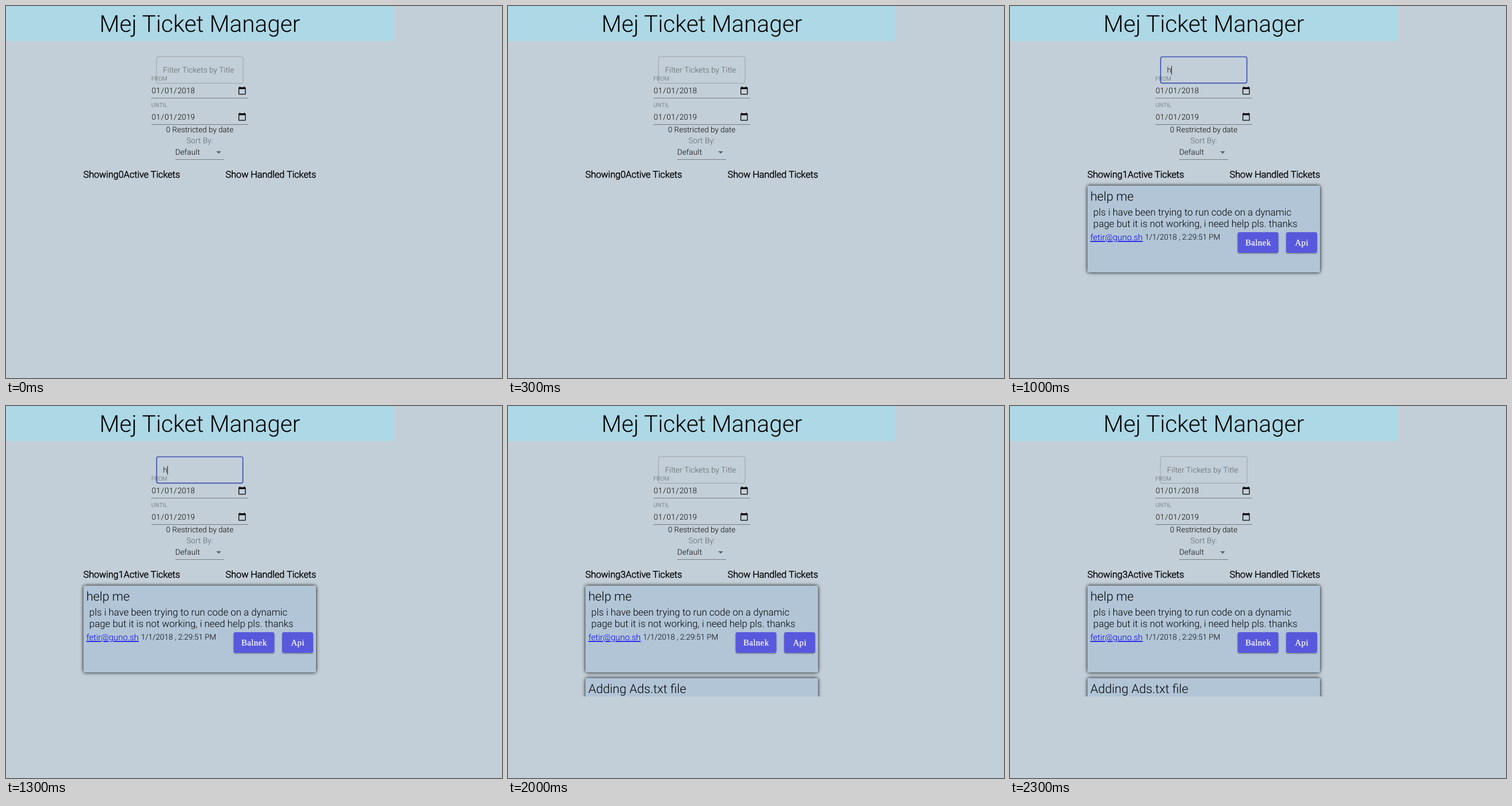
Write an HTML page that moves like this. It is 864 by 648 pixels and loops after 2.5 s.

```html
<!DOCTYPE html>
<html lang="en">
<head>
<meta charset="utf-8">
<title>Ticket manager</title>
<style>
  html, body { margin: 0; width: 100%; height: 100%; overflow: hidden; background: #c3cfd8; }
  svg { display: block; width: 864px; height: 648px; }
  text { font: 300 13.5px Roboto, sans-serif; text-rendering: geometricPrecision; white-space: pre; }
  .spaced { letter-spacing: .00938em; }
  .soft { fill-opacity: .54; }
  .label { font-size: 10.125px; }
  .end { text-anchor: end; }
  .mid { text-anchor: middle; }
  .bar { font-size: 16.2px; stroke: currentColor; stroke-width: .55px; fill: currentColor; color: #000; }
  .title { font-size: 21.6px; }
  .body { font-size: 16.875px; }
  .action { font-size: 20.25px; }
  .mail { font-size: 14.85px; fill: #00e; text-decoration: underline; }
  .tag { font: 14.85px "Liberation Serif", serif; letter-spacing: .02857em; fill: #fff; stroke: #fff; stroke-width: .25px; text-anchor: middle; }
  .line { fill: none; stroke: #000; stroke-opacity: .45; stroke-width: .9; }
  .card { fill: #b2c5d7; filter: url(#glow); }
  .button { fill: #5958dc; filter: url(#lift); }
</style>
</head>
<body>
<svg viewBox="0 0 864 648">
  <defs>
    <filter id="glow" x="-10%" y="-20%" width="120%" height="140%">
      <feDropShadow dx="0" dy="0" stdDeviation="3.3" flood-color="#000"/>
    </filter>
    <filter id="lift" x="-20%" y="-20%" width="140%" height="150%">
      <feDropShadow dx="0" dy="1.3" stdDeviation="1.3" flood-color="#000" flood-opacity=".4"/>
    </filter>
    <clipPath id="page"><path d="M0 0H675V506H0z"/></clipPath>
    <path id="calendar" transform="scale(.633)" d="M20 3h-1V1h-2v2H7V1H5v2H4c-1.1 0-2 .9-2 2v16c0 1.1.9 2 2 2h16c1.1 0 2-.9 2-2V5c0-1.1-.9-2-2-2zm0 18H4V8h16v13z"/>
    <g id="helpCard">
      <rect class="card" x="135" y="313" width="405" height="151" rx="3.4"/>
      <text class="title" x="140" y="338.5">help me</text>
      <text class="body" x="145.1" y="364.6">pls i have been trying to run code on a dynamic</text>
      <text class="body" x="145.1" y="384.9">page but it is not working, i need help pls. thanks</text>
      <text class="mail" x="140" y="408.4">fetir@guno.sh</text>
      <text x="235" y="407">1/1/2018 , 2:29:51 PM</text>
      <rect class="button" x="396.5" y="394" width="71" height="36" rx="3.4"/>
      <rect class="button" x="481" y="394" width="54" height="36" rx="3.4"/>
      <text class="tag" x="432.2" y="417">Balnek</text>
      <text class="tag" x="508.2" y="417">Api</text>
    </g>
  </defs>

  <g clip-path="url(#page)">
    <path fill="#add8e6" d="M0 0H675V61H0z"/>
    <text class="mid" x="337.5" y="44.8" style="font-size:40.5px">Mej Ticket Manager</text>

    <g data-scenes="0134">
      <rect x="262" y="88" width="151" height="46.6" rx="3.4" class="line" style="stroke-opacity:.25"/>
      <text class="spaced soft" x="273.6" y="116.3">Filter Tickets by Title</text>
    </g>
    <g data-scenes="2">
      <rect x="262.4" y="88.5" width="150.2" height="45.8" rx="3" fill="none" stroke="#3f51b5" stroke-width="1.7"/>
      <text class="spaced" x="273.6" y="116.3">h</text>
      <path d="M281.5 104.5V119.5" stroke="#000" stroke-width=".9"/>
    </g>

    <text class="spaced soft label" x="253" y="130">FROM</text>
    <text class="spaced" x="253.8" y="152" dx="0 0 .85 .85 0 .85 .85">01/01/2018</text>
    <use href="#calendar" x="403.7" y="139.6"/>
    <text class="spaced soft label" x="253" y="175.6">UNTIL</text>
    <text class="spaced" x="253.8" y="197.6" dx="0 0 .85 .85 0 .85 .85">01/01/2019</text>
    <use href="#calendar" x="403.7" y="185.2"/>
    <path class="line" d="M253 160.5H421.8M253 206.5H421.8M295 267.5H380"/>

    <text class="mid" x="337.5" y="219.7">0 Restricted by date</text>
    <text class="mid spaced soft" x="337.5" y="238.9">Sort By:</text>
    <text class="spaced" x="294.7" y="259.2">Default</text>
    <path class="soft" d="M366.2 253h8.5l-4.25 4.25z"/>

    <g data-scenes="0124">
      <text class="bar" x="134.8" y="299">Showing<tspan id="count">0</tspan>Active Tickets</text>
      <text class="bar end" x="540.2" y="299">Show Handled Tickets</text>
    </g>
    <g data-scenes="124"><use href="#helpCard"/></g>
    <g data-scenes="14">
      <rect class="card" x="135" y="474" width="405" height="151" rx="3.4"/>
      <text class="title" x="140" y="499.7">Adding Ads.txt file</text>
    </g>

    <g data-scenes="3">
      <text class="bar" x="134.8" y="299">Showing1Active</text>
      <text class="bar" x="134.8" y="318.5">Tickets</text>
      <g style="--dim:gray">
        <text class="bar" x="274.5" y="299" style="color:gray">(2hidden</text>
        <text class="bar end" x="344.5" y="318.5" style="color:gray">tickets -</text>
        <text class="bar end" x="408.8" y="299" style="color:#4444e4">restore</text>
        <text class="bar end" x="414" y="299" style="color:gray">)</text>
      </g>
      <text class="bar" x="414" y="299">Show Handled</text>
      <text class="bar" x="414" y="318.5">Tickets</text>

      <rect class="card" x="135" y="332.5" width="405" height="230" rx="3.4"/>
      <text class="title" x="140" y="358">Notifications not working</text>
      <text class="action end" x="535" y="357" fill="#1f6fdc">hide</text>
      <text class="body" x="145.1" y="384.2">Hi I was working with mej crm backend</text>
      <text class="body" x="145.1" y="404.4">notificatication and just stoped working.</text>
      <text class="body" x="145.1" y="424.7">See the code bellow</text>
      <text class="body" x="145.1" y="444.9">CRM Backend code</text>
      <text x="150.2" y="465.2" style="font-size:16.2px" fill="#2f86e6">see more</text>
      <text class="mail" x="140" y="488.4">dambefok@womeva.ai</text>
      <text x="293" y="487">7/12/2018 , 10:34:00 PM</text>
      <text class="action end" x="535" y="516" fill="#222">CLOSE TICKET</text>
    </g>
  </g>
</svg>
<script>
  const SCENE_MS = 500;
  const ACTIVE_COUNTS = [0, 3, 1, 1, 3];
  const parts = document.querySelectorAll('[data-scenes]');
  const count = document.getElementById('count');
  let shown = -1;

  function show(scene) {
    for (const part of parts) {
      part.style.display = part.dataset.scenes.includes(scene) ? '' : 'none';
    }
    count.textContent = ACTIVE_COUNTS[scene];
    shown = scene;
  }

  function tick() {
    const scene = Math.floor(performance.now() / SCENE_MS) % ACTIVE_COUNTS.length;
    if (scene !== shown) show(scene);
    requestAnimationFrame(tick);
  }
  tick();
</script>
</body>
</html>
```
